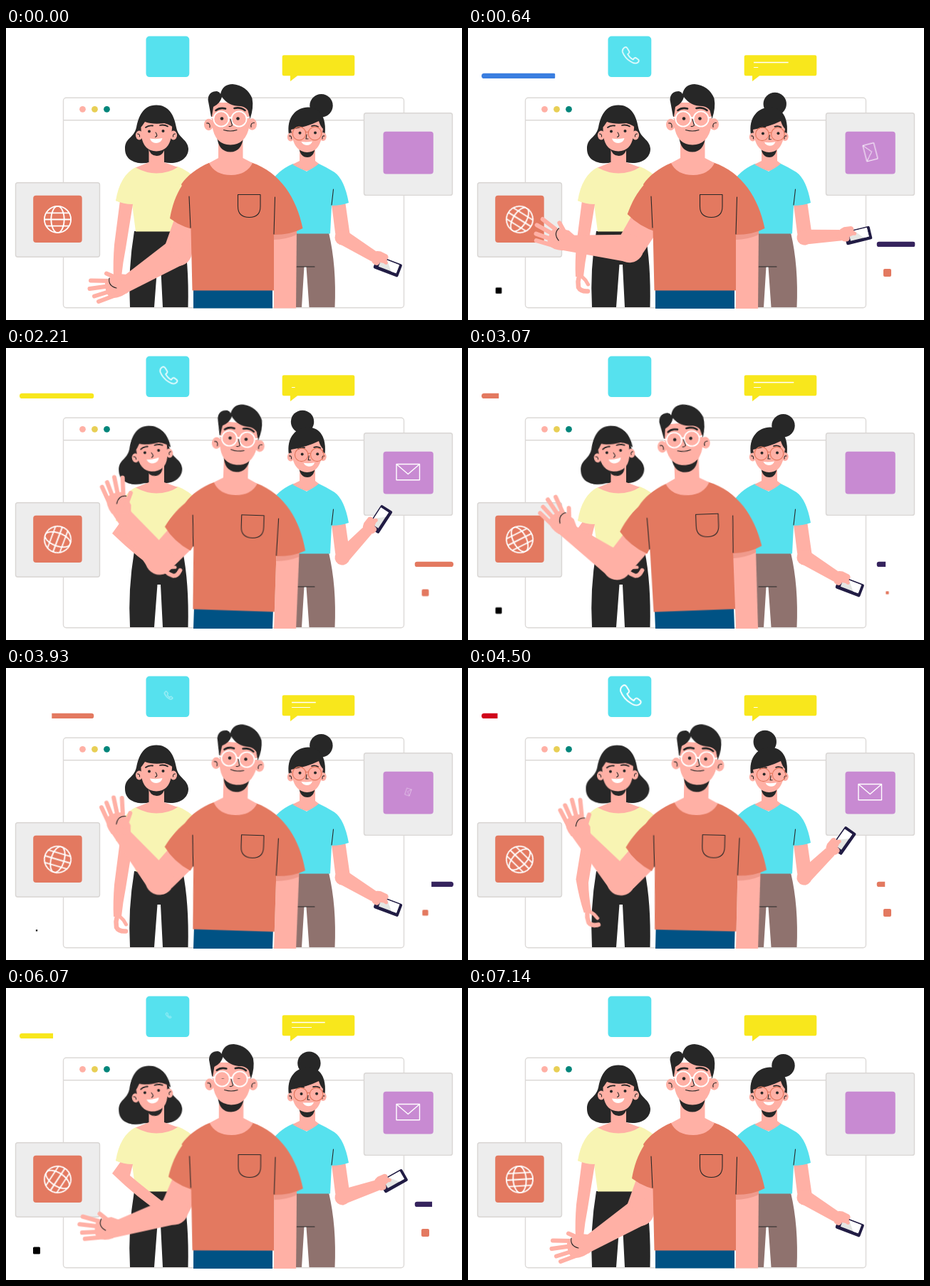
Recreate the animation shown at these times as an HTML page. Size 640 px wide and 411 px high, loop 7210 ms.

```html
<!DOCTYPE html>
<html lang="en">
<head>
<meta charset="utf-8">
<title>Team greeting</title>
<style>
html, body { margin: 0; width: 100%; height: 100%; overflow: hidden; background: #fff; }
svg { display: block; width: 100%; height: 100%; }

@property --sway { syntax: '<number>'; inherits: true; initial-value: 0; }
@property --up { syntax: '<number>'; inherits: true; initial-value: 0; }
@property --lift { syntax: '<number>'; inherits: true; initial-value: 0; }

.skin { fill: #ffb0a5; }
.dark { fill: #272727; }
.shirt { fill: #e37960; }
.ink { fill: none; stroke: #272727; stroke-width: 1.1; stroke-linecap: round; stroke-linejoin: round; }
.brow { fill: none; stroke: #272727; stroke-width: 2.2; stroke-linecap: round; }
.finger { fill: none; stroke: #ffb0a5; stroke-width: 6; stroke-linecap: round; stroke-linejoin: round; }
.icon { fill: none; stroke: #fff; stroke-width: 1.8; stroke-linejoin: round; }
.card { fill: #ededed; stroke: #d9d6d4; stroke-width: 1.4; }
.frame { fill: #fff; stroke: #dcd9d7; stroke-width: 1.4; }

/* Man */
.man { animation: sway 7.21s ease-in-out infinite, raise 7.21s ease-in-out infinite; }
.body { transform-origin: 318px 395px; transform: rotate(calc(var(--sway) * 1deg)); }
.head { transform-origin: 316px 187px; transform: rotate(calc(var(--sway) * 1.4deg)); }
.upper { transform-origin: 262px 228px; transform: rotate(calc(var(--up) * 20deg)); }
.fore { transform-origin: 241px 315px; transform: rotate(calc(var(--up) * 56deg + var(--sway) * 3deg)); }
.hand { transform-origin: 160px 362px; transform: rotate(calc(var(--sway) * 1.5deg)); }
.eyes { transform-origin: 315px 127.5px; animation: blink 7.21s linear infinite; }
@keyframes sway {
  0%, 14% { --sway: 0; } 17.9% { --sway: .2; } 29% { --sway: 2; }
  42.5% { --sway: -2.1; } 54.8% { --sway: 1.8; } 70.3% { --sway: .8; }
  84.2% { --sway: .2; } 87.3%, 100% { --sway: 0; }
}
@keyframes raise {
  0%, 1.5% { --up: 0; } 16.5%, 71% { --up: 1; }
  84.2% { --up: .18; animation-timing-function: ease-out; } 87.3%, 100% { --up: 0; }
}
@keyframes blink {
  0%, 82.2%, 86.5%, 100% { transform: none; } 83.6%, 84.9% { transform: scaleY(.15); }
}

/* Woman on the left */
.tilt { transform-origin: 211px 190px; animation: tilt 7.21s ease-in-out infinite; }
.hair { transform-origin: 211px 190px; animation: hair 7.21s ease-in-out infinite; }
.hip-arm { animation: hip-arm 7.21s ease-in-out infinite; }
.hip-hand { transform-origin: 157px 350px; animation: hip-hand 7.21s ease-in-out infinite; }
@keyframes tilt {
  0%, 16.6%, 53%, 59.6%, 96.5%, 100% { transform: rotate(0deg); }
  26.4%, 44.4%, 69.4%, 87.4% { transform: rotate(-8deg); }
}
@keyframes hair {
  0%, 16.6%, 53%, 59.6%, 96.5%, 100% { transform: translate(0, 0) rotate(0deg); }
  26.4%, 44.4%, 69.4%, 87.4% { transform: translate(-8px, 1px) rotate(-2deg); }
}
@keyframes hip-arm {
  0%, 16.6%, 53%, 59.6%, 96.5%, 100% { d: path("M160 243L152 305Q150 330 151 350L162 350Q164 330 168 310L178 248Z"); }
  26.4%, 44.4%, 69.4%, 87.4% { d: path("M162 243L149 261Q185 296 219 318L227 306Q195 282 174 264L178 248Z"); }
}
@keyframes hip-hand {
  0%, 16.6%, 53%, 59.6%, 96.5%, 100% { transform: translate(0, 0) rotate(0deg); }
  26.4%, 44.4%, 69.4%, 87.4% { transform: translate(67px, -37px) rotate(-62deg) scale(.88); }
}

/* Woman on the right */
.caller { animation: lift 3.605s ease-in-out infinite; }
.bun { transform: translate(calc(var(--lift) * -29px), calc(var(--lift) * -6px)); }
.face { transform: translate(calc(var(--lift) * 3.5px), calc(var(--lift) * 2px)); }
.phone-arm { transform-origin: 472px 295px; transform: rotate(calc(var(--lift) * -85.5deg)); }
@keyframes lift {
  0%, 8% { --lift: 0; } 30%, 58% { --lift: 1; }
  68.4% { --lift: .59; animation-timing-function: ease-out; } 80%, 100% { --lift: 0; }
}

/* Icons and accents */
.globe { transform-origin: 72.5px 269.5px; animation: spin 7.21s linear infinite; }
.call { transform-origin: 228px 38.5px; animation: call 3.605s linear infinite; }
.mail { transform-origin: 564.5px 174.5px; animation: mail 3.605s linear infinite; }
.black { transform-origin: 43px 369.5px; animation: black 2.40333s linear infinite; }
.orange { transform-origin: 588.5px 344.5px; animation: orange 1.8025s linear infinite; }
.dash { fill: none; stroke-dasharray: 1 2; stroke-dashoffset: 1.02; }
.text { stroke: #fff; stroke-width: 1.3; }
.one { animation: type-one 7.21s linear infinite; }
.two { animation: type-two 7.21s linear infinite; }
.bar { stroke-width: 9; }
.left { animation: pass 1.442s linear infinite, left-ink 7.21s step-end infinite; }
.right { animation: pass 1.442s linear infinite, right-ink 7.21s step-end infinite; }
@keyframes spin { to { transform: rotate(360deg); } }
@keyframes call {
  0% { transform: scale(0); } 9% { transform: scale(.42); } 22%, 59.4% { transform: scale(1.06); }
  68.4% { transform: scale(.28); } 72%, 100% { transform: scale(0); }
}
@keyframes mail {
  0%, 4% { transform: rotate(0deg) scale(0); } 9% { transform: rotate(108deg) scale(.3); }
  24%, 69% { transform: rotate(360deg) scale(1); } 82%, 100% { transform: rotate(0deg) scale(0); }
}
@keyframes black {
  0% { transform: scale(0); } 11% { transform: scale(.4); } 28% { transform: scale(.9); }
  33%, 53.5% { transform: scale(1); } 63.5% { transform: scale(.23); } 67%, 100% { transform: scale(0); }
}
@keyframes orange {
  0% { transform: scale(0); } 18% { transform: scale(.75); } 26%, 55% { transform: scale(1); }
  71% { transform: scale(.36); } 80%, 100% { transform: scale(0); }
}
@keyframes type-one {
  0%, 1.4%, 27%, 33.6%, 59.2%, 65.7%, 91.4%, 100% { stroke-dashoffset: 1.02; }
  6%, 22.3%, 38.1%, 54.5%, 70.3% { stroke-dashoffset: .47; }
  10.4%, 42.6% { stroke-dashoffset: .12; }
  13.2%, 18%, 45.4%, 50.2%, 77.5%, 82.4% { stroke-dashoffset: 0; }
  84.2% { stroke-dashoffset: .27; }
}
@keyframes type-two {
  0%, 5.8%, 32.6%, 37.7%, 64.8%, 69.9%, 98.5%, 100% { stroke-dashoffset: 1.02; }
  17.9%, 54.5% { stroke-dashoffset: .07; }
  70.3% { stroke-dashoffset: .93; }
  42.6% { stroke-dashoffset: .64; }
  19%, 22%, 50.5%, 54%, 82.7%, 84.9% { stroke-dashoffset: 0; }
}
@keyframes pass {
  0% { stroke-dashoffset: 1.02; } 12.9% { stroke-dashoffset: .77; } 21% { stroke-dashoffset: .55; }
  45%, 54% { stroke-dashoffset: 0; } 72.5% { stroke-dashoffset: -.43; }
  89.5% { stroke-dashoffset: -.96; } 97%, 100% { stroke-dashoffset: -1.02; }
}
@keyframes left-ink {
  0% { stroke: #3a7ee0; } 20% { stroke: #f8e71c; } 40% { stroke: #e37960; }
  60% { stroke: #d0021b; } 80%, 100% { stroke: #f8e71c; }
}
@keyframes right-ink {
  0%, 40%, 80%, 100% { stroke: #35235d; } 20%, 60% { stroke: #e37960; }
}
</style>
</head>
<body>
<svg viewBox="0 0 640 411">
  <defs>
    <clipPath id="left-pill"><rect x="19" y="63.7" width="104.5" height="7.4" rx="3.7"/></clipPath>
    <clipPath id="right-pill"><rect x="573.5" y="300.7" width="54.5" height="7.3" rx="3.6"/></clipPath>
    <clipPath id="floor"><rect width="640" height="394.5"/></clipPath>
  </defs>

  <!-- Browser window -->
  <rect class="frame" x="80.5" y="98.3" width="478" height="295.5" rx="4"/>
  <path class="frame" d="M80.5 129.7H558.5"/>
  <circle cx="107.5" cy="114.3" r="4.4" fill="#ffb0a5"/>
  <circle cx="124.5" cy="114.3" r="4.4" fill="#e8cf55"/>
  <circle cx="141.5" cy="114.3" r="4.4" fill="#00857a"/>

  <!-- Cards -->
  <rect class="card" x="13.5" y="217.7" width="118" height="104.6" rx="3"/>
  <rect class="shirt" x="38.2" y="235.8" width="68.5" height="66.2" rx="4"/>
  <g class="icon globe">
    <circle cx="72.5" cy="269.5" r="18.6"/>
    <ellipse cx="72.5" cy="269.5" rx="9.2" ry="18.6"/>
    <path d="M56.5 260.3H88.5M54 269.5H91M56.5 278.7H88.5"/>
  </g>
  <rect class="card" x="502.5" y="119.8" width="124" height="115.6" rx="3"/>
  <rect x="529.5" y="145.8" width="70.3" height="59.6" rx="4" fill="#c88ad2"/>
  <path class="icon mail" style="stroke-width:1.4" d="M548 163.5H580.5V185.8H548ZL564.3 177.5L580.5 163.5"/>
  <rect x="196.5" y="11.5" width="60.8" height="57.6" rx="5" fill="#56e1ee"/>
  <path class="icon call" d="M218.5 25.3Q221 24 223 27L226 32Q227 34.5 223.5 36.5Q227 43 232.5 45.5Q234.5 41.5 237 42.5L241 45.5Q243 47.5 240.5 50Q236 54 228 48.5Q219 43 215 33Q214 28 218.5 25.3Z"/>

  <!-- Speech bubble -->
  <path fill="#f8e71c" d="M390 38.2H487Q489.3 38.2 489.3 40.5V65Q489.3 67.3 487 67.3H409L399 75V67.3H390Q387.7 67.3 387.7 65V40.5Q387.7 38.2 390 38.2Z"/>
  <path class="dash text one" pathLength="1" d="M401 48.5H465"/>
  <path class="dash text two" pathLength="1" d="M401 55.5H429" style="stroke-width:1"/>

  <!-- Accents -->
  <g clip-path="url(#left-pill)"><path class="dash bar left" pathLength="1" d="M19 67.2H123.5"/></g>
  <g clip-path="url(#right-pill)"><path class="dash bar right" pathLength="1" d="M573.5 304.3H628"/></g>
  <rect class="black" x="38" y="364.5" width="10" height="10" rx="1.5"/>
  <rect class="shirt orange" x="583" y="339" width="11" height="11" rx="2"/>

  <!-- Woman on the left -->
  <g>
    <path class="dark" d="M180 286H248Q257 330 255.5 393H220L217 333H212.5L208 393H174Q171 340 180 286Z"/>
    <path fill="#f8f4b3" d="M182 196Q160 207 154 243Q165 248 177 248L182 286.5H248L270 215Q255 200 241 195Z"/>
    <path class="dark hair" d="M211 108.5C192 108.5 186 125 183 140C179 156 167 154 167 170C167 188 186 193 202 189H222C240 193 256 185 256 170C255 156 242 156 239 140C236 122 228 108.5 211 108.5Z"/>
    <path class="skin" d="M200.5 165V189L182 196.5Q197 204.5 211 204.5Q228 204.5 241 196L222 189V165Z"/>
    <g class="tilt">
      <path class="dark" d="M199.5 168Q202 180 211.5 180Q221 180 223 168Z"/>
      <ellipse class="skin" cx="187" cy="151" rx="5" ry="6.5"/>
      <ellipse class="skin" cx="235" cy="151" rx="5" ry="6.5"/>
      <path class="skin" d="M189 130L190 152Q193 173 211 173.5Q229 173 232 152L234 130Z"/>
      <path class="dark" d="M186 143Q184 112 211 111Q236 112 238 143L232 138Q227 135 222 134Q206 136 195 132Q191 139 186 143Z"/>
      <path class="brow" style="stroke-width:1.8" d="M196 140Q200 136.5 206 137.5M216 137Q222 135.5 227 138.5"/>
      <circle class="dark" cx="201" cy="145.5" r="2"/><circle class="dark" cx="220.5" cy="145" r="2"/>
      <path class="ink" d="M210 147Q214 152 209.5 153.5M184.5 149Q188 149 187.5 153M237.5 149Q234 149 234.5 153"/>
      <path fill="#fff" d="M202 155.5Q211 157 219.5 155Q218 162 210.5 162Q204 162 202 155.5Z"/>
    </g>
    <g class="hip-hand">
      <path class="finger" d="M156.5 347L154.5 357L155 365Q158 371 168 370.5" style="stroke-width:6.5"/>
      <path class="finger" d="M159 349L165 355L168.5 361" style="stroke-width:5"/>
    </g>
    <path class="skin hip-arm" d="M160 243L152 305Q150 330 151 350L162 350Q164 330 168 310L178 248Z"/>
    <path fill="#f8f4b3" d="M166 215L154 243Q165 248 177 248L178 225Z"/>
  </g>

  <!-- Woman on the right -->
  <g class="caller">
    <circle class="dark bun" cx="442.5" cy="109.3" r="16.2"/>
    <path fill="#8f726e" d="M395 288H453Q464 335 461.5 393H425.5L421.5 336H418.5L415 393H395Z"/>
    <path class="ink" d="M408 336H433"/>
    <path class="skin" d="M456.5 244L462 288Q465 305 474 305.5L483 293L476 244Z"/>
    <g class="phone-arm">
      <circle class="skin" cx="472" cy="295" r="10.5"/>
      <path class="skin" d="M469 304.5L480 287L519 314L513 328.5Z"/>
      <g transform="rotate(21 536 335)">
        <rect x="517.5" y="326" width="37" height="19" rx="2" fill="#211c44"/>
        <rect x="524" y="327.7" width="26.5" height="12.8" fill="#e4e6e3"/>
        <path fill="#fff" d="M532 327.7H550.5V340.5H543Z"/>
      </g>
      <path class="skin" d="M510 320Q515 312.5 526 314.5L535 319Q538.5 323 534.5 326L536 331Q534 335 530 331L525 330Q521 338 514 330Z"/>
    </g>
    <path fill="#56e1ee" d="M403 191Q380 201 370 220V289.5H455L457 250Q470 250 481 246Q475 213 461 203Q450 196 438 190.5L422 202Z"/>
    <path class="ink" d="M459.5 227L457 249"/>
    <path class="skin" d="M412 165V187L402 192Q414 199 422 201.5Q431 198 439 191L434 187V165Z"/>
    <path class="dark" d="M397 150C393 125 408 111.5 424 111.5C441 112 450 126 447.5 150Z"/>
    <path class="dark" d="M411 168Q413 182 423 182Q432 182 434 168Z"/>
    <ellipse class="skin" cx="399.5" cy="153.5" rx="4.7" ry="6"/>
    <ellipse class="skin" cx="445" cy="153" rx="4.7" ry="6"/>
    <path class="skin" d="M400 143Q423 139 439 131Q441 138 445 142L443 154Q439 174.5 422.5 175Q406 174 402 154Z"/>
    <path class="ink" d="M397.5 152Q401 151 400.5 156M447 152Q443.5 151 444 156"/>
    <g class="face">
      <path class="brow" style="stroke-width:1.8" d="M407 140Q411 138 416 138.5M429 138Q434 136.5 438 139"/>
      <circle class="dark" cx="412.5" cy="147.7" r="2"/><circle class="dark" cx="434" cy="147.5" r="2"/>
      <g fill="none" stroke="#e37960" stroke-width="1.2">
        <circle cx="411.5" cy="148.5" r="9.3"/><circle cx="433.5" cy="148.5" r="9.3"/>
        <path d="M420.5 147Q422.5 145.5 424.5 147"/>
      </g>
      <path class="ink" d="M422 150L421 156H424"/>
      <path fill="#fff" d="M414.5 160Q422 161 430 159.5Q428 165 422 165Q416.5 164.5 414.5 160Z"/>
    </g>
  </g>

  <!-- Man -->
  <g clip-path="url(#floor)"><g class="man"><g class="body">
    <path class="skin" d="M376 280H408L407 400H376Z"/>
    <path fill="#f09a8c" d="M376 290L408 286V291Q392 298 376 298Z"/>
    <path fill="#005284" d="M263 366H374V402H263Z"/>
    <g class="upper">
      <path class="skin" d="M236 270L276 284L261 318L221 312Z"/>
      <g class="fore">
        <circle class="skin" cx="241" cy="315" r="20"/>
        <path class="skin" d="M226 302L164 350L166 374.5L250 332Z"/>
        <g class="hand">
          <path class="skin" d="M170 347L158 346L145 352L139 359Q139 374 146 379Q156 382 168 374Z"/>
          <path class="finger" d="M148 356L119 355.5M146 363L117.5 367M148 370L124 377.5M154 376L130 385"/>
          <path class="finger" d="M160 354L141 345.5"/>
          <path class="ink" d="M145 352Q143 363 155 366"/>
        </g>
      </g>
      <path class="shirt" d="M285 190C252 204 236 233 230 268Q250 283 276 286L285 230Z"/>
    </g>
    <path class="shirt" d="M285 190C268 197 254 208 246 220L256 245L259.5 282L261.5 369.5H376V291Q400 291 416.5 282C408 240 385 203 345 189.5Z"/>
    <path class="ink" d="M257 237L259 281M377.5 238L376 290M325.5 234.5H357V251Q357 266.5 341.5 266.5Q325.5 266.5 325.5 251Z"/>
    <path class="skin" d="M298 150V183L285 190Q293 207 316 207Q338 206.5 346 190L332.5 183V150Z"/>
    <g class="head">
      <path class="dark" d="M296 152Q298 174.5 315 174.5Q331 174.5 333.5 152Z"/>
      <ellipse class="skin" cx="284.5" cy="136" rx="6.5" ry="8.3"/>
      <ellipse class="skin" cx="345.5" cy="135.5" rx="6.5" ry="8.3"/>
      <path class="skin" d="M288 105L289.5 138Q293 164 315 164.5Q337 164 341.5 138L344 105Z"/>
      <path class="dark" d="M288.5 128L283.5 101Q284 89 296 89Q300 90 301 93Q304 79 318 79Q338 81 345.5 99Q348 112 342.5 128L339.5 116Q336 111 329 110Q312 110 303 97Q301 106 291 111Z"/>
      <path class="brow" style="stroke-width:2.7" d="M294.5 116Q300 111.5 308 113.5M320.5 113Q329 111 335.5 116"/>
      <g class="eyes"><circle class="dark" cx="303" cy="127.5" r="2.3"/><circle class="dark" cx="325.5" cy="127.5" r="2.3"/></g>
      <g class="icon">
        <circle cx="302" cy="128" r="10.6"/><circle cx="327" cy="128" r="10.6"/>
        <path d="M312.5 127Q314.5 125 316.5 127M291.5 126.5L287 125.5M337.5 126.5L342 125.5"/>
      </g>
      <path class="ink" d="M315 128.5L317.5 137Q316 139 313 138.5M305.5 143.5Q315 146.5 324 143.5M281.500 134Q287 133 286 140M348.5 133.5Q343 133 344 139.5"/>
    </g>
  </g></g></g>
</svg>
</body>
</html>
```
